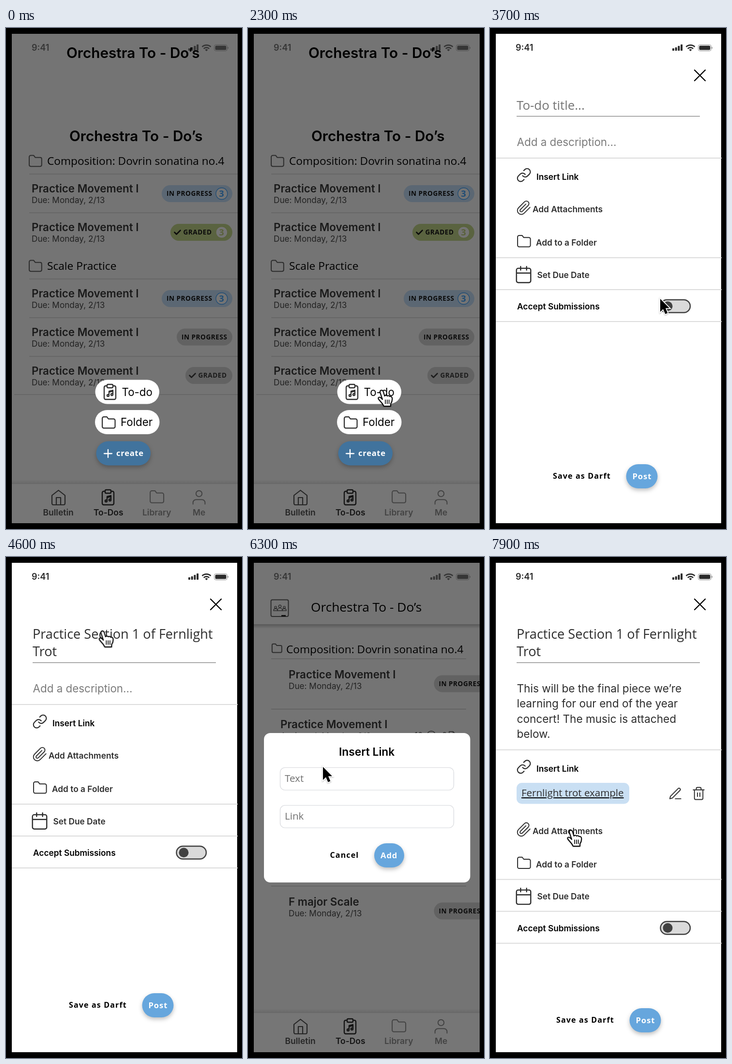
An HTML page for the animation above (8 s loop, 488 by 1036 pixels).

```html
<!DOCTYPE html>
<html lang="en">
<head>
<meta charset="utf-8">
<title>To-do app walkthrough</title>
<style>
html, body { margin: 0; width: 100%; height: 100%; overflow: hidden; background: #000; }
svg { display: block; width: 100vw; height: 100vh; }
text { font-optical-sizing: none; white-space: pre; }
.in { font-family: Inter, sans-serif; }
.sb { font-family: Inter, sans-serif; font-weight: 600; }
.os { font-family: "Open Sans", "Noto Sans", sans-serif; }
.ob { font-family: "Open Sans", "Noto Sans", sans-serif; font-weight: 700; }
.icon { fill: none; stroke-linecap: round; stroke-linejoin: round; }
.icon * { vector-effect: non-scaling-stroke; }
.soft { filter: drop-shadow(0 4px 4px rgba(0, 0, 0, .25)); }

.scene, #hand, #arrow { visibility: hidden; animation: 8s step-end infinite; }
#menu { animation-name: menu; }
#create { animation-name: create; }
#empty { animation-name: empty; }
#titled { animation-name: titled; }
#filled { animation-name: filled; }
#link { animation-name: link; }
#linked { animation-name: linked; }
#hand { animation-name: hand; }
#arrow { animation-name: arrow; }
#cursor { animation: move 8s infinite ease-in-out; }

@keyframes menu { 0% { visibility: visible } 31%, 100% { visibility: hidden } }
@keyframes create { 0%, 44.7% { visibility: hidden } 31% { visibility: visible } 100% { visibility: hidden } }
@keyframes empty { 0%, 57.2% { visibility: hidden } 44.7% { visibility: visible } 100% { visibility: hidden } }
@keyframes titled { 0%, 63.5% { visibility: hidden } 57.2% { visibility: visible } 100% { visibility: hidden } }
@keyframes filled { 0%, 74.8% { visibility: hidden } 63.5% { visibility: visible } 100% { visibility: hidden } }
@keyframes link { 0%, 92.2% { visibility: hidden } 74.8% { visibility: visible } 100% { visibility: hidden } }
@keyframes linked { 0% { visibility: hidden } 92.2%, 100% { visibility: visible } }
@keyframes hand {
  0%, 31%, 44.7%, 66.5%, 74.8%, 92.2% { visibility: hidden }
  23.5%, 39%, 54%, 72%, 86%, 96.5%, 100% { visibility: visible }
}
@keyframes arrow {
  0%, 39%, 54%, 72%, 86%, 96.5%, 100% { visibility: hidden }
  31%, 44.7%, 66.5%, 74.8%, 92.2% { visibility: visible }
}
@keyframes move {
  0%, 23.5% { transform: translate(262px, 868px) }
  27.5%, 33.75% { transform: translate(277px, 749px); animation-timing-function: ease-in }
  36.25% { transform: translate(290px, 644px); animation-timing-function: ease-out }
  41.25%, 46.25% { transform: translate(352px, 560px) }
  55%, 57.2% { transform: translate(200px, 152px) }
  62%, 63.5% { transform: translate(240px, 262px) }
  67.5% { transform: translate(289px, 379px) }
  73%, 78.75% { transform: translate(155px, 434px) }
  88.75%, 92.5% { transform: translate(310px, 616px) }
  98%, 100% { transform: translate(168px, 565px) }
}
</style>
</head>
<body>
<svg id="stage" viewBox="0 0 488 1036" xmlns="http://www.w3.org/2000/svg"></svg>
<script>
const BG = '#747474', BLUE = '#66a6dd', INK = '#2d2d2d', LINE = '#dcdcdc';
const DIM_BLUE = '#5b6773', DIM_GREEN = '#5a6340', DIM_GREY = '#626262';

const text = (x, y, size, cls, str, fill = '#000', gap = 0) =>
  `<text x="${x}" y="${y}" class="${cls}" font-size="${size}" fill="${fill}" letter-spacing="${gap}">${str}</text>`;
const box = (x1, y1, x2, y2, r, fill, extra = '') =>
  `<rect x="${x1}" y="${y1}" width="${x2 - x1}" height="${y2 - y1}" rx="${r}" fill="${fill}" ${extra}/>`;
const rule = (x1, x2, y, color, w = 1) => box(x1, y - w / 2, x2, y + w / 2, 0, color);
const icon = (x, y, k, name, color = INK, w = 2) =>
  `<g class="icon" transform="translate(${x} ${y}) scale(${k})" stroke="${color}" stroke-width="${w}"><path d="${shapes[name]}"/></g>`;
const scene = (id, body) => `<g id="${id}" class="scene">${body}</g>`;

const shapes = {
  folder: 'M4 1h6l3 4h10a3 3 0 0 1 3 3v12a3 3 0 0 1-3 3H4a3 3 0 0 1-3-3V4a3 3 0 0 1 3-3z',
  board: 'M7 4H4a3 3 0 0 0-3 3v22a3 3 0 0 0 3 3h18a3 3 0 0 0 3-3V7a3 3 0 0 0-3-3h-3M7 3a2 2 0 0 1 2-2h8a2 2 0 0 1 2 2v3a2 2 0 0 1-2 2H9a2 2 0 0 1-2-2z'
    + 'M11 24v-9l8-2v9M11 24a2 2 0 1 1-4 0 2 2 0 1 1 4 0M19 22a2 2 0 1 1-4 0 2 2 0 1 1 4 0M11 17l8-2',
  home: 'M3 9l9-7 9 7v11a2 2 0 0 1-2 2H5a2 2 0 0 1-2-2zM9 22V12h6v10',
  user: 'M20 21v-2a4 4 0 0 0-4-4H8a4 4 0 0 0-4 4v2M16 7a4 4 0 1 1-8 0 4 4 0 1 1 8 0',
  date: 'M4 4h18a3 3 0 0 1 3 3v18a3 3 0 0 1-3 3H4a3 3 0 0 1-3-3V7a3 3 0 0 1 3-3zM1 12h24M8 1v6M18 1v6',
  chain: 'M10 13a5 5 0 0 0 7.54.54l3-3a5 5 0 0 0-7.07-7.07l-1.72 1.71M14 11a5 5 0 0 0-7.54-.54l-3 3a5 5 0 0 0 7.07 7.07l1.71-1.71',
  clip: 'M21.44 11.05l-9.19 9.19a6 6 0 0 1-8.49-8.49l9.19-9.19a4 4 0 0 1 5.66 5.66l-9.2 9.19a2 2 0 0 1-2.83-2.83l8.49-8.48',
  trash: 'M3 6h18M19 6v14a2 2 0 0 1-2 2H7a2 2 0 0 1-2-2V6M8 6V4a2 2 0 0 1 2-2h4a2 2 0 0 1 2 2v2M10 11v6M14 11v6',
  edit: 'M12 20h9M16.5 3.5a2.1 2.1 0 0 1 3 3L7 19l-4 1 1-4z',
  cross: 'M-1-1L1 1M1-1L-1 1',
  plus: 'M-1 0H1M0-1V1',
  tick: 'M0 5l4 4 8-8',
  next: 'M0 0l10 10-10 10',
  person: 'M3 0a3 3 0 1 1-6 0 3 3 0 1 1 6 0M-6 10c0-8 12-8 12 0z',
  page: 'M1 1h8l4 4v12H1zM9 1v4h4',
  ring: 'M9 0a9 9 0 1 1-18 0 9 9 0 1 1 18 0M-4 0l3 3 5-6'
};

function status(color) {
  const bars = [5, 7, 10, 13].map((h, i) => box(377 + i * 5.7, 47 - h, 381 + i * 5.7, 47, 1, color)).join('');
  const wifi = `<g fill="none" stroke="${color}" stroke-width="2.6"><path d="M405.5 39a13 13 0 0 1 18 0M408.8 42.8a8 8 0 0 1 11.4 0"/></g>`
    + `<path d="M411.5 45a4.5 4.5 0 0 1 6 0l-3 3z" fill="${color}"/>`;
  return text(53, 47, 18, 'sb', '9:41', color) + bars + wifi
    + box(430.5, 34.5, 457.5, 47.5, 4, 'none', `stroke="${color}" stroke-opacity=".5"`)
    + box(432.5, 36.5, 455.5, 45.5, 2.5, color) + box(458.5, 39, 460, 43, 1, color, 'opacity=".5"');
}

function nav(y) {
  return box(12, 934, 479, 943, 0, 'url(#up)') + box(12, 943, 479, 1024, 0, '#767676')
    + icon(90.5, 953, 1.5, 'home', '#262626', 2.2) + icon(198, 954, 1, 'board', '#141414', 2.4)
    + icon(297, 956, 1.12, 'folder', '#434343') + icon(380.5, 952, 1.55, 'user', '#434343')
    + text(76.5, y, 17.5, 'sb', 'Bulletin', '#262626') + text(181, y, 17.4, 'sb', 'To-Dos', '#141414')
    + text(282, y, 17.4, 'sb', 'Library', '#434343') + text(386, y, 17.4, 'sb', 'Me', '#434343');
}

function item(x, y, title = 'Practice Movement I', due = 'Due: Monday, 2/13') {
  return text(x, y, 22.4, 'sb', title, '#1a1a1a') + text(x, y + 22, 17.2, 'in', due, '#222');
}

function badge(x, y, label, fill, { tick, ring, ink = '#0b0b0b' } = {}) {
  let out = box(x, y - 17.5, ring || tick ? 468 : x + 115, y + 17.5, 17.5, fill);
  if (tick) out += icon(x + 8.5, y - 5, 1, 'tick', ink, 2.6);
  if (ring) out += `<circle cx="446" cy="${y}" r="12" fill="${BG}" stroke="${ring}" stroke-width="1.3"/>`
    + text(440.5, y + 6.5, 18, 'ob', '3', ring);
  return out + text(x + (tick ? 26.5 : 10), y + 4.5, 13.7, 'ob', label, ink, .45);
}

const pill = (x1, y1, x2, label, tx, color = BLUE) =>
  box(x1, y1, x2, y1 + 50, 25, color, 'class="soft"') + text(tx, y1 + 30.5, 16.6, 'ob', label, '#fff', .95);
const bold = (x, y, str, fill = '#000') => text(x, y, 16, 'ob', str, fill, 1.15);
const label = (x, y, str, fill = INK) => text(x, y, 17.3, 'sb', str, fill);
const page = (fill, right = 479) => box(12, 12, right, 1024, 0, fill);
const piece = 'Composition: Dovrin sonatina no.4';

function menu() {
  const blue = { ring: '#1f4c75' };
  return page(BG) + status('#363636')
    + text(125, 62, 29.7, 'sb', 'Orchestra To - Do’s') + text(131, 234, 29.7, 'sb', 'Orchestra To - Do’s')
    + icon(47, 262.5, 1.03, 'folder') + text(85, 283, 22.7, 'os', piece)
    + icon(47, 479.5, 1.03, 'folder') + text(85, 500, 22.7, 'os', 'Scale Practice')
    + [302, 382, 519, 599, 679].map(y => rule(48, 479, y, '#5a5a5a') + item(53, y + 38)).join('')
    + rule(17, 479, 758, '#5a5a5a')
    + badge(322, 342.5, 'IN PROGRESS', DIM_BLUE, blue)
    + badge(340, 422.5, 'GRADED', DIM_GREEN, { tick: 1, ring: '#59613a' })
    + badge(322, 559.5, 'IN PROGRESS', DIM_BLUE, blue)
    + badge(353, 639, 'IN PROGRESS', DIM_GREY)
    + badge(371, 718.5, 'GRADED', DIM_GREY, { tick: 1, ink: '#1c1c1c' })
    + nav(1007.5)
    + box(184.5, 727.5, 317, 777.5, 25, '#fff') + icon(202, 736, 1, 'board', INK, 2.3) + text(239.5, 760.5, 22.3, 'in', 'To-do')
    + box(184, 790, 317.5, 840, 25, '#fff') + icon(198, 803, 1.06, 'folder', INK, 2.2) + text(237, 823, 22.3, 'in', 'Folder')
    + box(186.5, 854.5, 299, 904.5, 25, '#41739d', 'class="soft"') + icon(211, 880, 8, 'plus', '#fff', 2.3)
    + text(228, 885, 16.6, 'ob', 'create', '#fff', .7);
}

function backdrop() {
  return page(BG) + box(12, 139, 479, 148, 0, 'url(#down)') + status('#363636')
    + box(47.5, 88.5, 83.5, 123, 3, 'none', `stroke="${INK}" stroke-width="2"`)
    + icon(57, 104, .7, 'person', INK, 1.4) + icon(75, 104, .7, 'person', INK, 1.4) + icon(66, 102, .9, 'person', INK, 1.4)
    + rule(69, 78, 121.5, '#111', 3)
    + text(130, 113, 26.3, 'os', 'Orchestra To - Do’s')
    + icon(49, 179, .8, 'folder') + text(79, 199, 22.7, 'os', piece)
    + [210.5, 314.5, 680.5].map(y => rule(48, 451, y, '#565656')).join('')
    + item(84, 251) + item(67, 354, undefined, 'Assigned: Monday, 2/6')
    + text(344, 375, 17, 'in', '10', '#222') + icon(379, 369, 1, 'ring', INK, 1.5)
    + text(401, 375, 17, 'in', '0', '#222') + icon(415, 360, 1, 'page', INK, 1.5)
    + item(84, 721, 'F major Scale')
    + badge(384.5, 262, 'IN PROGRESS', DIM_GREY) + badge(384.5, 732, 'IN PROGRESS', DIM_GREY)
    + nav(1006.5);
}

function createModal() {
  return backdrop() + box(32, 338, 461, 698, 13, '#fff')
    + icon(422.5, 377, 7, 'cross', '#000', 2.4)
    + text(57, 417, 25.8, 'os', 'To-do title...', '#747474') + rule(57, 435.5, 430.5, '#7d7d7d', 1.2)
    + icon(58, 451, 1.03, 'date') + label(99, 472, 'Set Due Date')
    + icon(58, 504, 1.06, 'folder') + label(97, 525, 'Add to a Folder')
    + bold(230.5, 571, 'Add more details', '#222') + icon(411, 556, 1, 'next', '#333', 2.2)
    + pill(214, 617, 279, 'post', 226.5);
}

function linkModal() {
  const field = (y, str) => box(66.5, y, 425.5, y + 46.5, 10, '#fff', 'stroke="#d6d8dc" stroke-width="1.2"')
    + text(76, y + 29.5, 20.6, 'os', str, '#707070');
  return backdrop() + box(33, 364, 459.5, 673, 13, '#fff')
    + text(188, 411, 22.8, 'sb', 'Insert Link') + field(435.5, 'Text') + field(513.5, 'Link')
    + bold(169.5, 622, 'Cancel') + pill(261, 592, 323, 'Add', 274);
}

function form({ title, body, link }) {
  const low = title ? 36 : 0, dy = low + (body ? 93.7 : 0), rest = dy + (link ? 62 : 0);
  const [bx, by] = body ? [7, 31] : [0, 0];
  const bar = y => rule(12, 479, y, LINE, 2);
  let out = page('#fff', 478) + status('#2a2a2a') + icon(434, 98, 11, 'cross', '#000', 2.4);
  out += title
    ? text(55, 169, 27.1, 'os', 'Practice Section 1 of Fernlight', INK) + text(55, 205, 27.1, 'os', 'Trot', INK)
    : text(55, 169, 25.8, 'os', 'To-do title...', '#747474');
  out += rule(55, 434, 182.5 + low, '#777', 1.2);
  out += body
    ? ['This will be the final piece we’re', 'learning for our end of the year', 'concert! The music is attached', 'below.']
      .map((s, i) => text(55.5, 280 + i * 31.3, 22.6, 'in', s, INK)).join('')
    : text(55.5, 244 + low, 22.4, 'in', 'Add a description...', '#7b7b7b');
  out += bar(269 + dy) + icon(54, 288 + dy, 1.34, 'chain', INK, 2.2) + label(96, 314 + dy, 'Insert Link', '#000');
  if (link) out += box(55, 467, 288, 510.5, 11, '#c9dff3')
    + `<g text-decoration="underline">${text(65, 495, 20.5, 'os', 'Fernlight trot example', INK)}</g>`
    + icon(368, 474.5, 1.27, 'edit', INK, 1.9) + icon(416.5, 474, 1.25, 'trash', INK, 1.9);
  return out + `<g transform="translate(0 ${rest})">`
    + icon(54, 356, 1.34, 'clip', INK, 1.9) + label(88, 381, 'Add Attachments')
    + icon(56, 428, 1.06, 'folder') + label(95, 450, 'Add to a Folder')
    + bar(475) + icon(53.5, 492, 1.23, 'date', INK, 2.4) + label(97.5, 516.5, 'Set Due Date')
    + bar(541) + label(56, 582, 'Accept Submissions', '#000')
    + box(352.5, 562, 414, 588.5, 13.2, '#dadada', 'stroke="#414141" stroke-width="2.5"')
    + '<circle cx="367.5" cy="575.3" r="10" fill="#414141"/>' + bar(607) + '</g>'
    + bold(130 + bx, 932 + by, 'Save as Darft') + pill(281.5 + bx, 902 + by, 346.5 + bx, 'Post', 294.5 + bx);
}

const shade = (id, a, b) => `<linearGradient id="${id}" x2="0" y2="1"><stop stop-color="#000" stop-opacity="${a}"/>`
  + `<stop offset="1" stop-color="#000" stop-opacity="${b}"/></linearGradient>`;

const cursor = `<g id="cursor" style="filter:drop-shadow(0 1px 1px rgba(0,0,0,.3))">
  <path id="arrow" d="M0 0V27L6 21.3 10.5 31.5 15.3 29.4 11 19.3H19Z" fill="#000" stroke="#fff" stroke-width="3.4" paint-order="stroke"/>
  <g id="hand" stroke="#000" stroke-width="2" stroke-linejoin="round" stroke-linecap="round">
    <path fill="#fff" d="M-4 4Q-4 0-1 0 2 0 3 4L5.5 12Q8 9 11 12 14 10 16 13 20 12 21 16 22 22 18 28V33H4Q1 27-4 22-9 17-7 15-4 13 0 18L1 19Z"/>
    <path fill="none" stroke-width="1.6" d="M7 20v8M10.8 20v8M14.6 20v8"/>
  </g></g>`;

document.getElementById('stage').innerHTML =
  `<defs>${shade('up', 0, .1)}${shade('down', .24, 0)}</defs>`
  + scene('menu', menu())
  + scene('create', createModal())
  + scene('empty', form({}))
  + scene('titled', form({ title: true }))
  + scene('filled', form({ title: true, body: true }))
  + scene('link', linkModal())
  + scene('linked', form({ title: true, body: true, link: true }))
  + '<path d="M0 0H488V1036H0ZM12 12V1024H479V12Z" fill="#000"/>'
  + cursor;
</script>
</body>
</html>
```
